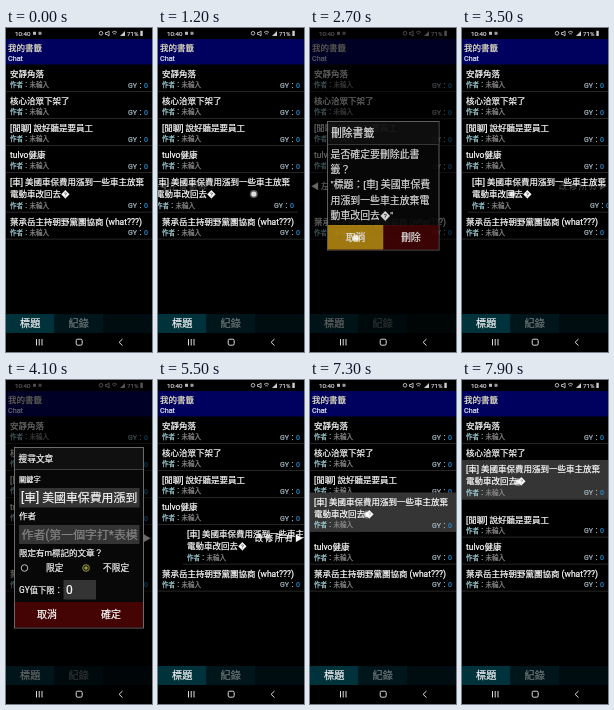
Recreate the animation shown at these times as an HTML page. Size 146x324 px, loop 8000 ms.

```html
<!DOCTYPE html>
<html lang="zh-Hant">
<head>
<meta charset="utf-8">
<title>我的書籤</title>
<style>
html, body { margin: 0; width: 100%; height: 100%; overflow: hidden; background: #000; }
svg { display: block; width: 100%; height: 100%; font-family: Roboto, "Noto Sans CJK TC", "Noto Sans CJK", sans-serif; }
text { white-space: pre; stroke-width: 0.22px; }
</style>
</head>
<body>
<svg id="stage" viewBox="0 0 146 324"></svg>
<script>
const LOOP = 8000, STEP = 100;
const ROW_TOP = 145, ROW_H = 39.5;

// A thin stroke in the same colour keeps small glyphs bright
const text = (x, cy, size, fill, str, anchor = 'start') =>
  `<text x="${x}" y="${cy + size * 0.36}" font-size="${size}" fill="${fill}" stroke="${fill}" text-anchor="${anchor}">${str}</text>`;
const span = (fill, str) => `<tspan fill="${fill}" stroke="${fill}">${str}</tspan>`;
const box = (x, y, w, h, fill, extra = '') =>
  `<rect x="${x}" y="${y}" width="${w}" height="${h}" fill="${fill}" ${extra}/>`;
const group = (id, body) => `<g id="${id}">${body}</g>`;

// One bookmark: title lines, author and score
function row(id, y, lines, back = '') {
  const h = 15 + lines.length * 12 + (lines.length > 1 ? 0.5 : 0);
  const sub = y + h - 7;
  return group(id,
    back +
    lines.map((s, i) => text(4, y + 9 + i * 12, 8.5, '#fff', s)).join('') +
    text(4, sub, 6.5, '#8a8a8a', span('#a4d6de', '作者：') + '未輸入') +
    text(142, sub, 7, '#a9bcc4', 'GY：' + span('#2f86c4', '0'), 'end') +
    box(0, y + h - 0.8, 146, 0.8, '#303030'));
}

const statusBar =
  text(9, 5.5, 6.2, '#c4c4c4', '10:40') +
  box(27, 3.8, 3, 3, '#bbb') + box(32.5, 3.8, 3, 3, '#999') +
  '<g fill="none" stroke="#c8c8c8" stroke-width="0.9"><circle cx="95" cy="5.3" r="1.8"/>' +
  '<path d="M99.5 4.5h1.5l2-1.5v5l-2-1.5h-1.5zM106 4.4q2.5-2.2 5 0M107.2 6q1.3-1.2 2.6 0"/></g>' +
  '<path d="M114 8l5-5v5z" fill="#c8c8c8"/>' +
  text(121, 5.5, 6.2, '#c8c8c8', '71%') +
  box(134.3, 2.8, 2.5, 5.2, '#c8c8c8');

const header = box(0, 11, 146, 25.5, '#00005e') +
  text(2, 19.5, 8.5, '#eeeac4', '我的書籤') +
  text(2, 30.5, 7.2, '#e2e6f6', 'Chat');

const tabs = box(0, 286, 146, 19, '#000d10') +
  box(0, 286, 48.5, 19, '#00323c') + box(48.5, 286, 48.5, 19, '#00161b') +
  text(14, 295.5, 10.2, '#f4f4f4', '標題') + text(62.5, 295.5, 10.2, '#6c7678', '紀錄');

const navBar = box(0, 305, 146, 19, '#000') +
  '<g fill="none" stroke="#ddd" stroke-width="1">' +
  '<path d="M30.5 311v6.5M33.2 311v6.5M36 311v6.5M116.5 311l-3.4 3.3 3.4 3.3"/>' +
  '<rect x="70.2" y="311.2" width="6" height="6" rx="1.4"/></g>';

function frame(x, y, w, h, headH, title) {
  return box(x, y, w, h, '#080808', 'stroke="#858585" stroke-width="0.8"') +
    box(x + 0.5, y + 0.5, w - 1, headH, '#101010') +
    box(x + 0.5, y + headH, w - 1, 0.8, '#4c4c4c') + title;
}

function buttons(id, x, y, w, h, left, right) {
  return box(x, y, w, h, '#440404') +
    box(x, y, w / 2, h, '#b58a12', `id="${id}Press"`) +
    text(x + w / 4, y + h / 2, 10, '#fff', left, 'middle') +
    text(x + w * 0.75, y + h / 2, 10, '#fff', right, 'middle');
}

const message = ['是否確定要刪除此書', '籤？', '"標題：[車] 美國車保費', '用漲到一些車主放棄電', '動車改回去\uFFFD"'];
const deleteBox =
  frame(17.5, 93.5, 111.5, 128.5, 22.5, text(21, 105.5, 10.8, '#fff', '刪除書籤')) +
  message.map((s, i) => text(20.5, 126.5 + i * 15.2, 9.9, '#f6f6f6', s)).join('') +
  buttons('delete', 18, 197, 110.5, 24.5, '取消', '刪除');

const radio = (x, color, on) =>
  `<circle cx="${x}" cy="188" r="3.3" fill="none" stroke="${color}" stroke-width="1"/>` +
  (on ? `<circle cx="${x}" cy="188" r="1.8" fill="${color}"/>` : '');
const searchBox =
  frame(8.5, 67.5, 129, 180.5, 21.5, text(12.5, 79, 8.7, '#f6f6f6', '搜尋文章')) +
  text(13, 99.5, 7.2, '#f4f4f4', '關鍵字') +
  box(13, 108, 120.5, 19.5, '#343434') + text(15, 118, 11.9, '#f6f6f6', '[車] 美國車保費用漲到') +
  text(13, 136, 8.5, '#f4f4f4', '作者') +
  box(13, 145, 120.5, 19, '#343434') + text(15.5, 154.5, 11.9, '#858585', '作者(第一個字打*表模') +
  text(13, 172.5, 8.5, '#f4f4f4', '限定有m標記的文章？') +
  radio(18.5, '#bbb', false) + text(40, 188, 8.7, '#f4f4f4', '限定') +
  radio(80, '#9a9a34', true) + text(97, 188, 8.7, '#f4f4f4', '不限定') +
  text(13, 210, 8.3, '#f4f4f4', 'GY值下限：') +
  box(57.5, 200, 32.5, 19.5, '#343434') + text(60, 210, 12, '#f6f6f6', '0') +
  buttons('search', 9, 222, 128, 25.5, '取消', '確定');

document.getElementById('stage').innerHTML =
  box(0, 0, 146, 324, '#000') + statusBar +
  row('row1', 37, ['安靜角落']) +
  row('row2', 64, ['核心洽眾下架了']) +
  row('row3', 91, ['[閒聊] 說好聽是要員工']) +
  row('row4', 118, ['tulvo健康']) +
  row('row6', 184.5, ['葉承岳主持朝野黨團協商 (what???)']) +
  row('held', ROW_TOP, ['[車] 美國車保費用漲到一些車主放棄', '電動車改回去\uFFFD'],
    box(0, ROW_TOP, 146, ROW_H, '#353535', 'id="glow"')) +
  group('hintLeft', text(1, 158, 8, '#fff', '◀ 左 滑 刪 除')) +
  group('hintRight', text(145, 158, 8, '#fff', '改 修 所 有 ▶', 'end')) +
  header + tabs +
  box(0, 0, 146, 305, '#000', 'id="dim"') +
  group('deleteBox', deleteBox) + group('searchBox', searchBox) + navBar +
  group('touch', '<circle r="4" fill="#fff" opacity="0.35"/><circle r="2.6" fill="#fff" opacity="0.8"/>');

const el = id => document.getElementById(id);
const clamp = v => Math.max(0, Math.min(1, v));
const fade = (id, v) => el(id).setAttribute('opacity', v);
const move = (id, x, y) => el(id).setAttribute('transform', `translate(${x} ${y})`);
const during = (t, a, b) => t >= a && t < b;

// Linear interpolation through [time, value] points
function track(t, points) {
  if (t <= points[0][0]) return points[0][1];
  for (let i = 1; i < points.length; i++) {
    const [t0, v0] = points[i - 1], [t1, v1] = points[i];
    if (t <= t1) return v0 + (v1 - v0) * (t - t0) / (t1 - t0);
  }
  return points[points.length - 1][1];
}

const slide = [[1100, 0], [1200, -6], [1300, -34], [1400, -80], [1500, -146],
  [2900, -146], [3000, -80], [3100, -25], [3200, -8], [3300, 0],
  [3400, 0], [3500, 6], [3600, 34], [3700, 80], [3800, 146],
  [5300, 146], [5400, 80], [5500, 25], [5600, 8], [5700, 0]];
const deleteFade = [[1500, 0], [1600, 0.5], [1700, 0.9], [1800, 1], [2600, 1], [2700, 0.88], [2800, 0.5], [2900, 0]];
const searchFade = [[3800, 0], [3900, 0.5], [4000, 0.9], [4100, 1], [5200, 1], [5300, 0.5], [5400, 0]];
const dimming = [[1500, 0], [1800, 0.45], [2000, 0.6], [2700, 0.6], [2900, 0],
  [3800, 0], [4100, 0.58], [5200, 0.58], [5400, 0]];

function touchPoint(t, dx, dy) {
  if (during(t, 1200, 1500)) return [100 + dx * 0.7, 166];
  if (during(t, 2500, 2800)) return [46, 210];
  if (during(t, 3500, 3800)) return [46 + dx * 0.7, 166];
  if (during(t, 5200, 5300)) return [41, 235];
  if (t >= 6700) return [58 + dy / 32, 167 + dy];
  return null;
}

function draw(t) {
  const dx = track(t, slide);
  const k = clamp((t - 6900) / 800);
  const dy = -65 * k * k * (3 - 2 * k);
  const top = ROW_TOP + dy;

  move('held', dx, dy);
  fade('glow', t >= 6500 ? 1 : 0);
  move('row4', 0, ROW_H * clamp((134 - top) / 8));
  move('row3', 0, ROW_H * clamp((107 - top) / 8));
  fade('hintLeft', clamp(-dx / 25));
  fade('hintRight', clamp(dx / 25));

  fade('dim', track(t, dimming));
  fade('deleteBox', track(t, deleteFade));
  fade('searchBox', track(t, searchFade));
  fade('deletePress', during(t, 2500, 2900) ? 1 : 0);
  fade('searchPress', during(t, 5200, 5400) ? 1 : 0);

  const p = touchPoint(t, dx, dy);
  fade('touch', p ? 1 : 0);
  if (p) move('touch', ...p);
}

const start = performance.now();
function tick(now) {
  const t = Math.max(0, now - start) % LOOP;
  draw(Math.floor(t / STEP) * STEP);
  requestAnimationFrame(tick);
}
draw(0);
requestAnimationFrame(tick);
</script>
</body>
</html>
```
